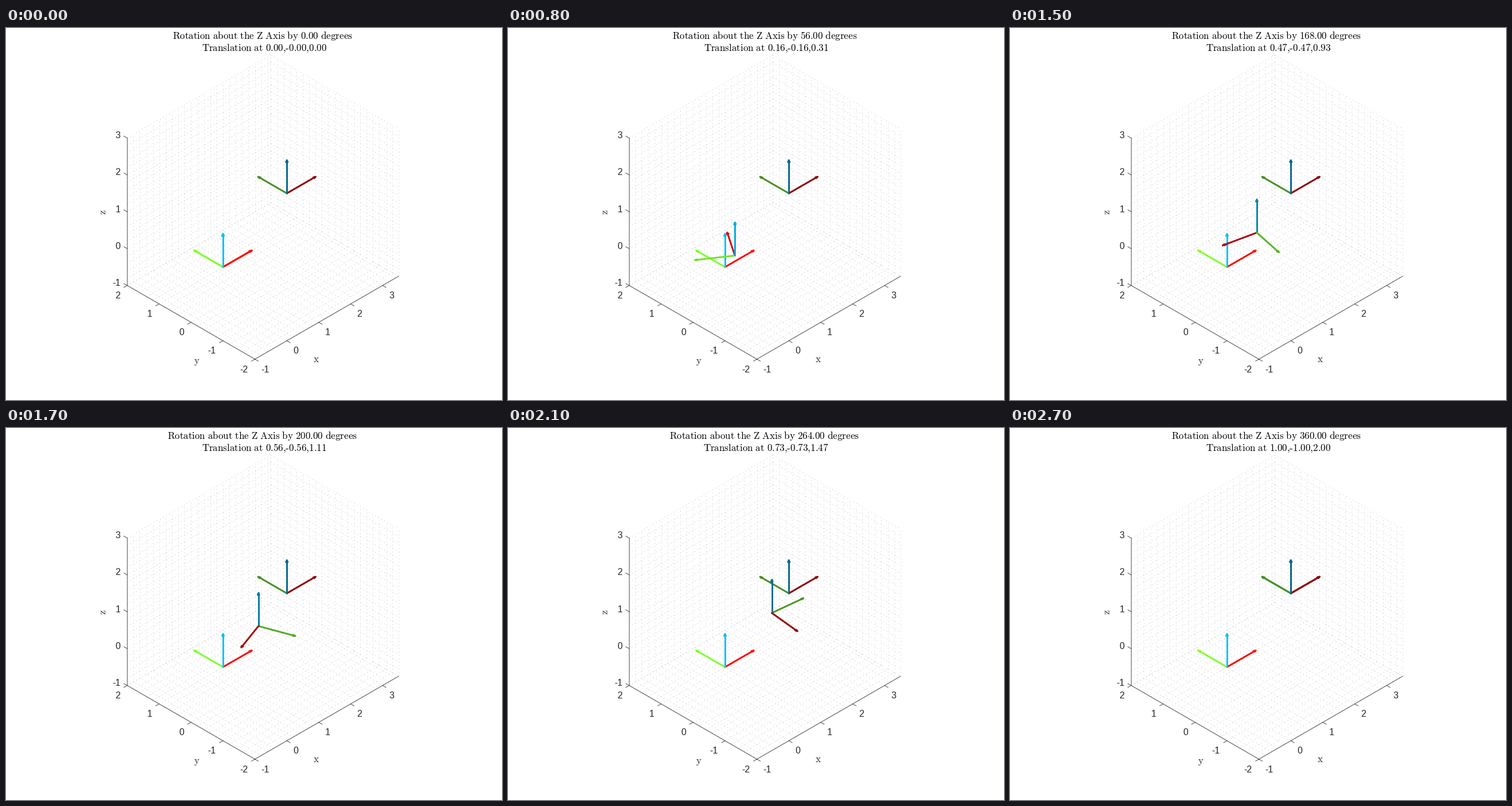
Animation of 864 by 648 pixels, one loop 2750 ms. Source, as a matplotlib script:

```python
import numpy as np
import matplotlib.pyplot as plt
from matplotlib.animation import FuncAnimation
from matplotlib.collections import LineCollection

plt.rcParams["mathtext.fontset"] = "cm"

W, H, DPI = 864, 648, 72
HOLD, STEPS, INTERVAL = 10, 45, 50
INK = (0.15, 0.15, 0.15)
BRIGHT = np.array([(255, 0, 0), (127, 255, 42), (0, 191, 255)]) / 255
DARK = np.array([(139, 0, 0), (70, 143, 35), (0, 104, 139)]) / 255
GOAL = np.array([1, -1, 2])
LENGTH = 0.9
PIECES = 12

fig = plt.figure(figsize=(W / DPI, H / DPI), dpi=DPI, facecolor="white")
ax = fig.add_axes([0, 0, 1, 1])
ax.set_xlim(0, W)
ax.set_ylim(H, 0)
ax.axis("off")


def project(p):
    """Isometric view of 3D points in stage pixels."""
    x, y, z = np.moveaxis(np.asarray(p, float), -1, 0)
    return np.stack([378 + 55.6 * (x - y),
                     416.4 - 32.1 * (x + y) - 64.2 * z], axis=-1)


def depth(p):
    return p @ np.array([-1, -1, 1])


def latex(s):
    return "$" + r"\ ".join(r"\text{%s}" % w for w in s.split()) + "$"


def draw_grid():
    xs = np.arange(-1, 3.5, 0.2)
    ys = np.linspace(-2, 2, 21)
    zs = np.linspace(-1, 3, 21)
    lines = []
    for x in xs:
        lines += [[(x, -2, -1), (x, 2, -1)], [(x, 2, -1), (x, 2, 3)]]
    for y in ys:
        lines += [[(-1, y, -1), (3.5, y, -1)], [(3.5, y, -1), (3.5, y, 3)]]
    for z in zs:
        lines += [[(-1, 2, z), (3.5, 2, z)], [(3.5, 2, z), (3.5, -2, z)]]
    ax.add_collection(LineCollection(project(lines), colors="0.68", linewidths=0.8,
                                     linestyles=[(0, (1.25, 6.25))], zorder=1))


def tick(point, step, value, offset, align):
    p = project(point)
    q = p + step
    ax.plot([p[0], q[0]], [p[1], q[1]], color=INK, lw=0.8)
    ax.text(p[0] + offset[0], p[1] + offset[1], str(value), color=INK, ha=align,
            va="center_baseline", family="Liberation Sans", size=16)


def draw_axes():
    frame = project([(-1, 2, 3), (-1, 2, -1), (-1, -2, -1), (3.5, -2, -1)])
    ax.plot(*frame.T, color=INK, lw=0.8)
    for z in range(-1, 4):
        tick((-1, 2, z), (-6, -3.4), z, (-12, -5.5), "right")
    for y in range(-2, 3):
        tick((-1, y, -1), (-6, 3.4), y, (-12.5, 16.6), "right")
    for x in range(-1, 4):
        tick((x, -2, -1), (6, 3.4), x, (11, 16.6), "left")
    for name, x, y, turn in (("x", 540.5, 576.5, 0), ("y", 332.5, 581, 0),
                             ("z", 169, 321, 90)):
        ax.text(x, y, latex(name), color=INK, ha="center", va="center",
                size=17, rotation=turn)


def triad(origin, angle, colors):
    """Depth-tagged segments of three arrows turned about z."""
    c, s = np.cos(angle), np.sin(angle)
    ways = np.array([(c, s, 0), (-s, c, 0), (0, 0, 1)])
    sides = np.array([(-s, c, 0), (c, s, 0), (0.7, -0.7, 0)])
    parts = []
    for way, side, color in zip(ways, sides, colors):
        pts = origin + np.linspace(0, LENGTH, PIECES + 1)[:, None] * way
        flat = project(pts)
        for i in range(PIECES):
            parts.append((depth(pts[i:i + 2].mean(axis=0)), flat[i:i + 2], color))
        tip = pts[-1]
        back = tip - 0.055 * way
        barb = 0.02 * side
        parts.append((depth(tip), project([back + barb, tip, back - barb]), color))
    return parts


draw_grid()
draw_axes()
arrows = LineCollection([], linewidths=2.9, capstyle="round", joinstyle="round", zorder=5)
ax.add_collection(arrows)
title = ax.text(446.7, 19.5, "", ha="center", va="baseline", size=17)
subtitle = ax.text(449.6, 39.5, "", ha="center", va="baseline", size=17)


def update(i):
    k = max(0, i - HOLD + 1)
    t = k / STEPS
    turn = 360 * t
    mix = np.sin(t * np.pi / 2)
    parts = triad(np.zeros(3), 0, BRIGHT) + triad(GOAL, 0, DARK)
    parts += triad(GOAL * t, np.radians(turn), BRIGHT + (DARK - BRIGHT) * mix)
    parts.sort(key=lambda part: part[0])
    arrows.set_segments([part[1] for part in parts])
    arrows.set_color([part[2] for part in parts])
    title.set_text(latex(f"Rotation about the Z Axis by {turn:.2f} degrees"))
    subtitle.set_text(latex(f"Translation at {t:.2f},-{t:.2f},{2 * t:.2f}"))
    return arrows, title, subtitle


anim = FuncAnimation(fig, update, frames=HOLD + STEPS, interval=INTERVAL,
                     repeat=True, repeat_delay=0)
plt.show()
```
